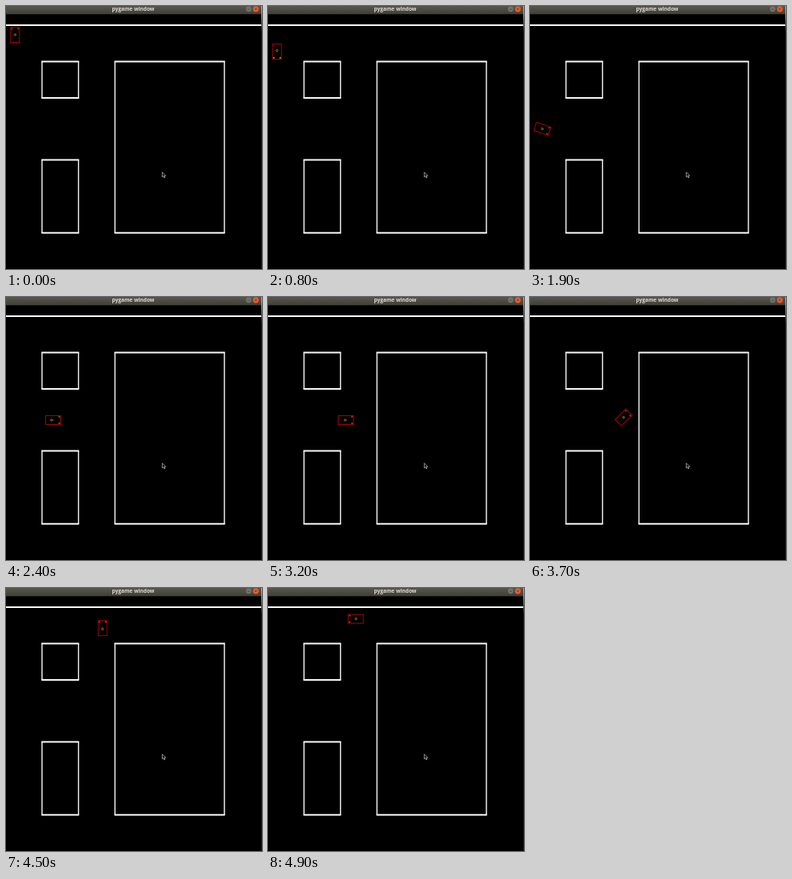
These frames come from a looping animation (320x329 px, 5 s). An HTML page:

```html
<!DOCTYPE html>
<html lang="en">
<head>
<meta charset="utf-8">
<title>pygame window</title>
<style>
html, body { margin: 0; width: 100%; height: 100%; overflow: hidden; background: #000; }
svg { display: block; width: 100%; height: 100%; }
</style>
</head>
<body>
<svg viewBox="0 0 320 329">
  <defs>
    <linearGradient id="bar" x2="0" y2="1">
      <stop offset="0" stop-color="#58574d"/>
      <stop offset="1" stop-color="#403f38"/>
    </linearGradient>
    <linearGradient id="edge" x2="0" y2="1">
      <stop offset="0" stop-color="#b4b4b0"/>
      <stop offset=".04" stop-color="#8a8a88"/>
      <stop offset=".1" stop-color="#171a21"/>
    </linearGradient>
  </defs>
  <rect width="320" height="329"/>
  <rect width="320" height="10.3" fill="url(#bar)"/>
  <rect x="319" width="1" height="329" fill="url(#edge)"/>
  <text x="159" y="6.4" text-anchor="middle" font-family="'Open Sans', 'Noto Sans', sans-serif" font-size="6.55" font-weight="700" fill="#dfdbd2">pygame window</text>
  <circle cx="303.3" cy="3.8" r="3.4" fill="#77736a"/>
  <path d="M301.8 4.2h3" stroke="#3c3a35" stroke-width=".7"/>
  <circle cx="312.3" cy="3.8" r="3.6" fill="#e95d30"/>
  <path d="M311 2.5l2.6 2.6m0-2.6l-2.6 2.6" stroke="#60301e" stroke-width=".7"/>
  <path d="M0 24H319" stroke="#fff" stroke-width="2.2"/>
  <g id="walls" fill="none" stroke="#f8f8f8"></g>
  <path d="M195.3 207.8v6.2l1.5-1.3 1 2.3 1-.5-1-2.2h1.9z" fill="#000" stroke="#ccc" stroke-width=".7"/>
  <path id="route" fill="none" d="M11.3 36V148A6 6 0 0 0 17.3 154H108.7A12 12 0 0 0 120.7 142V49.6A11 11 0 0 0 109.7 38.6"/>
  <g id="car" fill="none">
    <rect x="-9.5" y="-5.5" width="19" height="11" stroke="#a40404"/>
    <path id="tail" stroke="#a83a18" stroke-width=".9"/>
    <circle id="hub" r="1.2" stroke="#b08a5c" stroke-width=".8"/>
    <g id="lights">
      <circle cx="7.6" cy="-4" r="1"/>
      <circle cx="7.6" cy="4" r="1"/>
    </g>
  </g>
</svg>
<script>
const LOOP = 5000, STEP = 100, START = 400;
const $ = id => document.getElementById(id);
const clamp = v => Math.min(1, Math.max(0, v));
const ease = u => u * u * u * (10 - 15 * u + 6 * u * u);

const wall = (x, y, w, h) =>
  `<path d="M${x} ${y}v${h}m${w} 0v${-h}" stroke-width="1.4"/>` +
  `<path d="M${x - .7} ${y}h${w + 1.4}m0 ${h}h${-w - 1.4}" stroke-width="2"/>`;
$('walls').innerHTML =
  wall(45, 69.5, 45.6, 45.5) + wall(45, 192.5, 45.6, 91.3) + wall(136.2, 69.5, 136.8, 214.3);

// Each leg speeds up and brakes: start, end, distance along the route
const legs = [
  [350, 1800, 119],
  [1800, 2880, 73],
  [2940, 3590, 30],
  [3660, 4640, 104],
  [4500, 4900, 15.3]
];
const distance = t =>
  legs.reduce((sum, [from, to, length]) => sum + length * ease(clamp((t - from) / (to - from))), 0);

function draw(time) {
  const t = Math.floor(time % LOOP / STEP) * STEP;
  const d = distance(t), speed = d - distance(t - STEP);
  const at = s => $('route').getPointAtLength(s);
  const p = at(d), a = at(d - .3), b = at(d + .3);
  const heading = t < START ? -90 : Math.atan2(b.y - a.y, b.x - a.x) * 180 / Math.PI;
  $('car').setAttribute('transform', `translate(${p.x} ${p.y}) rotate(${heading})`);

  const back = -Math.min(2.2, speed * .17);
  $('hub').setAttribute('cx', back);
  $('tail').setAttribute('d', `M${back + 1.3} 0H${Math.max(back + 1.3, 1.2)}`);
  const hue = 20 + 100 * clamp((speed - 7) / 6);
  $('lights').setAttribute('fill', `hsl(${hue} 90% 38%)`);
}

const begin = performance.now();
function tick() {
  draw(performance.now() - begin);
  requestAnimationFrame(tick);
}
tick();
</script>
</body>
</html>
```
